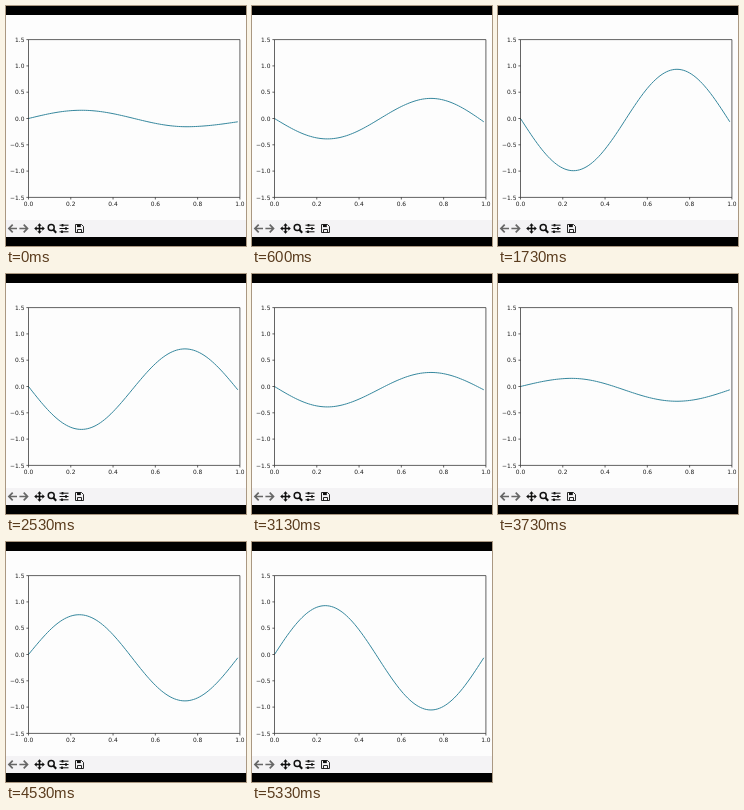
Recreate the animation shown at these times as an HTML page. Size 240 px wide and 240 px high, loop 5390 ms.

```html
<!DOCTYPE html>
<html lang="en">
<head>
<meta charset="utf-8">
<title>Vibrating string</title>
<style>
html, body { margin: 0; width: 100%; height: 100%; overflow: hidden; background: #000; }
svg { display: block; width: 100vw; height: 100vh; }
text { font: 5.9px "DejaVu Sans", sans-serif; fill: #1a1a1a; }
.axes { fill: none; stroke: #222; stroke-width: .7; }
.wave { fill: none; stroke: #35879d; stroke-width: 1; stroke-linejoin: round; }
.icon { fill: none; stroke: #111; stroke-width: 1.5; }
.nav { stroke: #666; stroke-width: 1.7; }
.solid { fill: #111; stroke: none; }
</style>
</head>
<body>
<svg viewBox="0 0 240 240">
  <rect y="9" width="240" height="206" fill="#fdfdfd"/>
  <rect y="214" width="240" height="17" fill="#f4f3f5"/>
  <path class="wave" id="wave"/>
  <path class="axes" id="axes"/>
  <g id="labels"></g>
  <g class="icon">
    <path class="nav" d="M6.7 218.6L2.9 222.5L6.7 226.4M3 222.5H11"/>
    <path class="nav" d="M17.7 218.6L21.5 222.5L17.7 226.4M21.4 222.5H13.4"/>
    <path d="M33.5 219V226M30 222.5H37"/>
    <path class="solid" d="M33.5 217.2l2.2 2.5h-4.4zM33.5 227.8l2.2-2.5h-4.4zM28.2 222.5l2.5-2.2v4.4zM38.8 222.5l-2.5-2.2v4.4z"/>
    <circle cx="45.2" cy="221.5" r="3"/>
    <path d="M47.4 223.8L50.2 226.7" stroke-width="2"/>
    <path d="M53.5 219.2H62.5M53.5 222.5H62.5M53.5 225.8H62.5" stroke-width="1"/>
    <path d="M56.5 217.9V220.5M60 221.2V223.8M56 224.5V227.1" stroke-width="1.8"/>
    <path d="M69.5 218.5H75.5L77.5 220.5V226.5H69.5ZM71.5 226.5V223.5H75.5V226.5" stroke-width=".9"/>
    <path class="solid" d="M71 218.5h3.8v2.6h-3.8z"/>
  </g>
</svg>
<script>
const LEFT = 22.5, RIGHT = 233.9, TOP = 33.6, BOTTOM = 191.4;
const px = x => LEFT + x * (RIGHT - LEFT);
const py = y => (TOP + BOTTOM) / 2 - y * (BOTTOM - TOP) / 3;
const $ = id => document.getElementById(id);

function label(str, x, y, anchor) {
  const el = document.createElementNS("http://www.w3.org/2000/svg", "text");
  el.setAttribute("x", x);
  el.setAttribute("y", y);
  el.setAttribute("text-anchor", anchor);
  el.textContent = str;
  $("labels").append(el);
}

let frame = `M${LEFT} ${TOP}H${RIGHT}V${BOTTOM}H${LEFT}Z`;
for (let i = 0; i <= 5; i++) {
  const x = px(i / 5);
  frame += `M${x} ${BOTTOM}v2.1`;
  label((i / 5).toFixed(1), x, BOTTOM + 8.5, "middle");
}
for (let i = -3; i <= 3; i++) {
  const y = py(i / 2);
  frame += `M${LEFT} ${y}h-2.1`;
  label((i / 2).toFixed(1).replace("-", "\u2212"), LEFT - 4.1, y + 2.15, "end");
}
$("axes").setAttribute("d", frame);

// String fixed at both ends, released from sin(2πx) on [0, LEN]
const LEN = 0.99, END = Math.sin(2 * Math.PI * LEN);
const rest = x => END * x / LEN;
const shape = x => Math.sin(2 * Math.PI * x) - rest(x);

// Odd extension with period 2 * LEN
function extend(x) {
  const r = x - 2 * LEN * Math.round(x / (2 * LEN));
  return Math.sign(r) * shape(Math.abs(r));
}

const height = (x, shift) => rest(x) + (extend(x + shift) + extend(x - shift)) / 2;

const LOOP = 5390, STEP = 200 / 3, START = 0.225, TRAVEL = 0.00982;
const stepTime = n => Math.round(n * STEP / 10) * 10;
let shown = -1;

function draw(now) {
  const t = now % LOOP;
  let n = Math.min(80, Math.floor(t / STEP) + 1);
  while (stepTime(n) > t) n--;
  if (n !== shown) {
    shown = n;
    const pts = Array.from({ length: 100 }, (_, i) => {
      const x = i / 100;
      return px(x).toFixed(2) + " " + py(height(x, START + n * TRAVEL)).toFixed(2);
    });
    $("wave").setAttribute("d", "M" + pts.join("L"));
  }
}

const begin = performance.now();
function tick() {
  draw(performance.now() - begin);
  requestAnimationFrame(tick);
}
tick();
</script>
</body>
</html>
```
